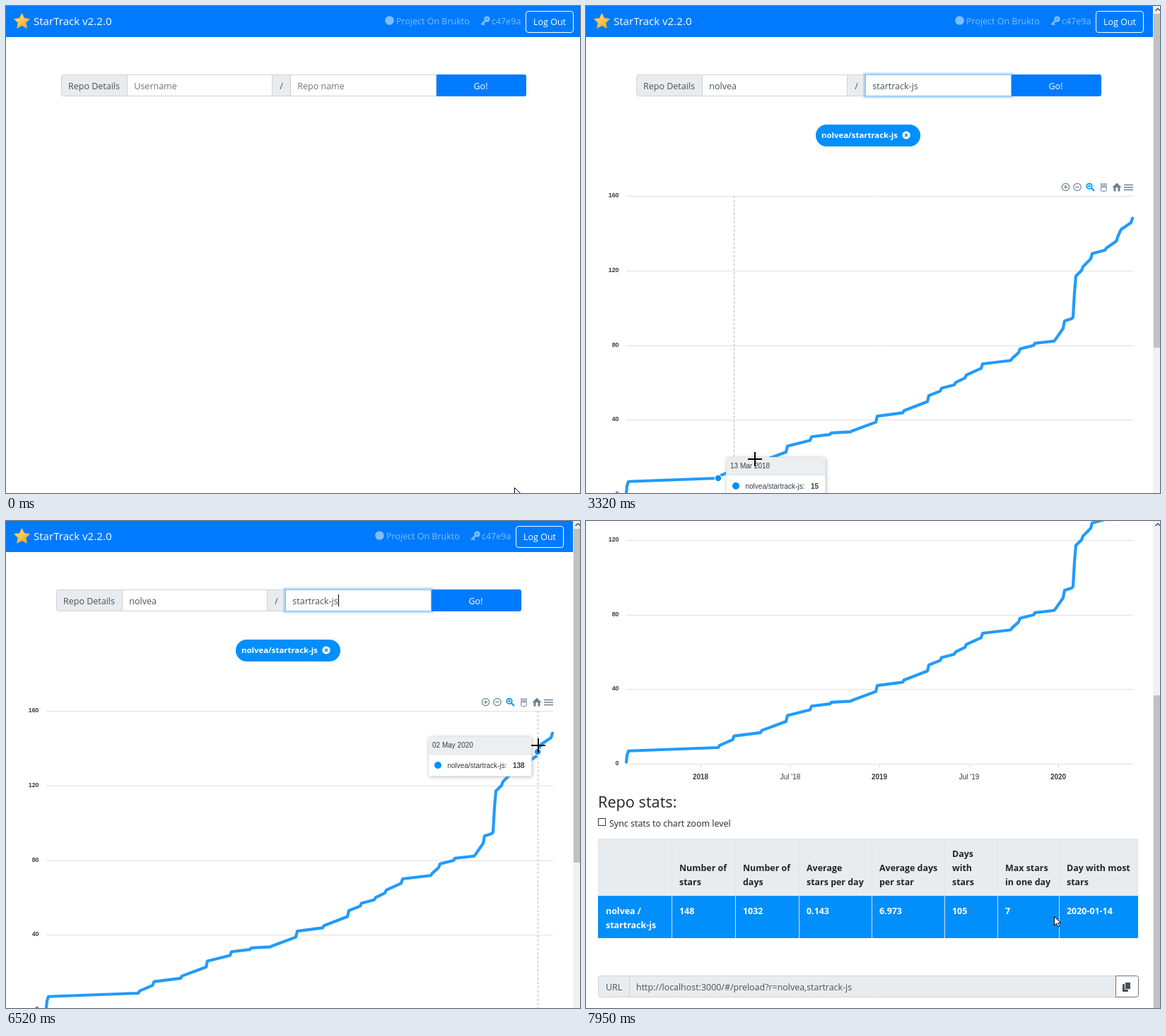
An HTML page with a canvas for the animation above (8 s loop, 812x690 px).

```html
<!DOCTYPE html>
<html lang="en">
<head>
<meta charset="utf-8">
<title>StarTrack</title>
<style>
html, body { margin: 0; width: 100%; height: 100%; overflow: hidden; background: #fff; }
canvas { display: block; }
</style>
</head>
<body>
<canvas id="stage" width="812" height="690"></canvas>
<script>
const ctx = document.getElementById('stage').getContext('2d');
const LOOP = 8000, USER = 'nolvea', REPO = 'startrack-js', TOKEN = 'c47e9a';
const UI = '"Open Sans", "Noto Sans", sans-serif', CHART = '"Liberation Sans", Arial, sans-serif';
const BLUE = '#007bff', SERIES = '#008ffb', GREY = '#e9ecef', EDGE = '#ced4da', INK = '#495057', DARK = '#212529', ICON = '#6e8192';
const LOADED = 2650, HOVER_START = 3120, HOVER_END = 6320, LEAVE_CHART = 7250;

// A few milestones (x, stars); between them the count climbs slowly, then jumps.
const MILESTONES = [[57, 1], [60, 7], [189, 10], [209.4, 15], [249, 18], [285, 26], [319, 31], [347, 33], [376, 34],
  [412, 42], [450, 45], [485, 53], [503, 57], [523, 60], [538, 64], [561, 70], [603, 73], [614, 78], [635, 81], [664, 83],
  [677, 93], [689, 95], [693, 117], [703, 122], [716, 129], [736, 132], [752.2, 138], [757, 142], [773, 148]];
const points = MILESTONES.flatMap(([x, v], i) =>
  i ? [[x - 2, v - .4 * (v - MILESTONES[i - 1][1])], [x, v]] : [[x, v]]);

// Key rows: time, values...
const HOVER_X = [[3120, 187], [3320, 239], [4220, 365], [4320, 490], [4420, 523], [4520, 528], [5120, 671], [6320, 753]];
const POINTER = [[100, 720, 682], [700, 218, 122], [2550, 218, 122], [3120, 187, 661],
  [7150, 753, 319], [7750, 734, 543], [7950, 663, 560]];

const clamp = (v, lo, hi) => Math.max(lo, Math.min(hi, v));
const chartY = stars => 692.3 - 2.647 * stars;

function sample(rows, at) {
  if (at <= rows[0][0]) return rows[0].slice(1);
  const next = rows.findIndex(row => row[0] > at);
  if (next < 0) return rows[rows.length - 1].slice(1);
  const a = rows[next - 1], b = rows[next], k = (at - a[0]) / (b[0] - a[0]);
  return a.slice(1).map((v, i) => v + (b[i + 1] - v) * k);
}

// While hovering, the pointer rides along the line.
function pointerAt(t) {
  if (t < HOVER_START || t > 7150) return sample(POINTER, t);
  const [x] = sample(HOVER_X, t);
  return [x, chartY(sample(points, x)[0]) - 8];
}
function nearestPoint(t) {
  const [x] = sample(HOVER_X, t);
  return points.reduce((best, p) => Math.abs(p[0] - x) < Math.abs(best[0] - x) ? p : best);
}
const scrollAt = t => Math.round(348 * (1 - (1 - clamp((t - 6650) / 500, 0, 1)) ** 2.2));

function text(str, x, y, size, color, { bold = false, align = 'left', family = UI } = {}) {
  ctx.font = `${bold ? 'bold ' : ''}${size}px ${family}`;
  ctx.textAlign = align;
  ctx.fillStyle = color;
  ctx.fillText(str, x, y);
}
function box(x, y, w, h, fill, edge, radius = 0) {
  ctx.beginPath();
  ctx.roundRect(edge ? x + .5 : x, edge ? y + .5 : y, edge ? w - 1 : w, edge ? h - 1 : h, radius);
  if (fill) { ctx.fillStyle = fill; ctx.fill(); }
  if (edge) { ctx.strokeStyle = edge; ctx.lineWidth = 1; ctx.stroke(); }
}
function dot(x, y, r, fill, edge, width = 1) {
  ctx.beginPath();
  ctx.arc(x, y, r, 0, 7);
  if (fill) { ctx.fillStyle = fill; ctx.fill(); }
  if (edge) { ctx.strokeStyle = edge; ctx.lineWidth = width; ctx.stroke(); }
}
function line(coords, color, width = 1) {
  ctx.beginPath();
  for (let i = 0; i < coords.length; i += 2) ctx.lineTo(coords[i], coords[i + 1]);
  ctx.strokeStyle = color;
  ctx.lineWidth = width;
  ctx.stroke();
}
function polygon(coords, fill, edge) {
  ctx.beginPath();
  for (let i = 0; i < coords.length; i += 2) ctx.lineTo(coords[i], coords[i + 1]);
  ctx.closePath();
  ctx.fillStyle = fill;
  ctx.fill();
  if (edge) { ctx.strokeStyle = edge; ctx.lineWidth = 1; ctx.stroke(); }
}

function navbar(shift) {
  const pale = '#80bdff';
  box(0, 0, 812, 44, BLUE);
  const star = [];
  for (let i = 0; i < 10; i++) {
    const r = i % 2 ? 5.6 : 11.5, a = i * Math.PI / 5 - Math.PI / 2;
    star.push(22.5 + r * Math.cos(a), 22 + r * Math.sin(a));
  }
  const gold = ctx.createLinearGradient(14, 10, 30, 33);
  gold.addColorStop(0, '#ffe680');
  gold.addColorStop(1, '#f2a51d');
  polygon(star, gold, '#e9b44a');
  text('StarTrack v2.2.0', 39, 27, 15.1, '#fff');
  ctx.save();
  ctx.translate(-shift, 0);
  dot(542.5, 20.5, 6.3, pale);
  text('Project On Brukto', 552, 25.5, 12.5, pale);
  line([672.5, 26.5, 679, 20], pale, 2.6);
  line([674, 24.5, 677, 27], pale, 2);
  dot(680.5, 18.5, 2.6, null, pale, 3);
  text(TOKEN, 687, 25.5, 12.5, pale);
  box(735, 7, 68, 31, null, '#fff', 3.5);
  text('Log Out', 769, 27, 12.5, '#fff', { align: 'center' });
  ctx.restore();
}

function form(t, shift) {
  const typed = (str, begin) => str.slice(0, clamp(Math.floor((t - begin) / 60), 0, str.length));
  const focus = t >= 1270 ? 1 : t >= 790 ? 0 : -1;
  const fields = [
    { x: 171, w: 206, value: typed(USER, 850), hint: 'Username' },
    { x: 402, w: 207, value: typed(REPO, 1270), hint: 'Repo name' }];
  ctx.save();
  ctx.translate(-shift / 2, 0);
  box(78, 97, 94, 31, GREY, EDGE, [3, 0, 0, 3]);
  text('Repo Details', 88, 117.5, 12.5, INK);
  box(376, 97, 27, 31, GREY, EDGE);
  text('/', 389.5, 117.5, 12.5, INK, { align: 'center' });
  box(608, 97, 128, 31, BLUE, null, 3);
  text('Go!', 671.5, 117.5, 12.5, '#fff', { align: 'center' });
  fields.forEach(({ x, w, value, hint }, i) => {
    const active = i === focus;
    box(x, 97, w, 31, '#fff', active ? '#80bdff' : EDGE);
    if (active) {
      ctx.strokeStyle = 'rgba(0,123,255,.25)';
      ctx.lineWidth = 2.7;
      ctx.strokeRect(x - 1.3, 95.7, w + 2.6, 33.6);
    }
    text(value || hint, x + 10.3, 117.5, 12.5, value ? INK : '#6c757d');
    const caretOn = t < 2050 || (t + 80) % 600 < 300;
    if (active && caretOn) {
      const end = x + 10.3 + (value ? ctx.measureText(value).width : 0);
      box(Math.round(end), 104, 1, 17, '#000');
    }
  });
  ctx.restore();
}

function progress(t) {
  box(0, 44, 812, 13, GREY);
  box(0, 44, 812 * clamp((t - 2350) / 300, 0, 1), 13, '#28a745');
}

function toolbar() {
  for (const x of [678.5, 695]) {
    dot(x, 256.5, 5.2, null, ICON, 1.2);
    line([x - 2.8, 256.5, x + 2.8, 256.5], ICON, 1.2);
  }
  line([678.5, 253.7, 678.5, 259.3], ICON, 1.2);
  dot(712, 255.3, 3.7, null, SERIES, 1.7);
  line([710, 255.3, 714, 255.3], SERIES, 1.2);
  line([712, 253.3, 712, 257.3], SERIES, 1.2);
  line([715, 258, 719, 262], SERIES, 2);
  box(728, 256, 9, 7, null, ICON, 2);
  for (let i = 0; i < 4; i++) line([729 + i * 2.3, 257, 729 + i * 2.3, 251], ICON, 1.2);
  polygon([744.5, 257, 751, 250.5, 757.5, 257], ICON);
  box(746.5, 257, 3, 5.5, ICON);
  box(752.5, 257, 3, 5.5, ICON);
  for (const y of [253.5, 257, 260.5]) line([761, y, 774, y], ICON, 1.5);
}

const chartText = (str, x, y, size, options) => text(str, x, y, size, '#373d3f', { family: CHART, ...options });

function chart(t) {
  box(325, 168, 148, 31, SERIES, null, 15.5);
  text(`${USER}/${REPO}`, 333, 187, 11.4, '#fff', { bold: true });
  dot(453, 183, 5.6, '#fff');
  line([451, 181, 455, 185], SERIES, 1.6);
  line([455, 181, 451, 185], SERIES, 1.6);
  toolbar();

  for (let v = 0; v <= 160; v += 40) {
    const y = Math.round(chartY(v)) + .5;
    line([57, y, 774, y], '#e0e0e0');
    chartText(String(v), 46.5, y + 1.5, 8.9, { align: 'right', bold: true });
  }
  for (let half = 0; half < 5; half++) {
    const x = Math.round(162 + half * 126.5), year = 2018 + Math.floor(half / 2);
    line([x + .5, 692, x + .5, 698], '#e0e0e0');
    chartText(half % 2 ? `Jul '${year - 2000}` : String(year), x, 713.5, 10, { align: 'center', bold: half % 2 === 0 });
  }

  const hovering = t >= HOVER_START + 80 && t < LEAVE_CHART;
  const cross = nearestPoint(t - 100), marker = nearestPoint(t - 200);
  if (hovering) {
    const x = Math.floor(cross[0]) + .5;
    ctx.setLineDash([3, 3]);
    line([x, 269, x, 692], '#b6b6b6');
    ctx.setLineDash([]);
  }

  const k = clamp((t - LOADED) / 520, 0, 1), grow = k * k * (3 - 2 * k);
  ctx.save();
  ctx.lineJoin = ctx.lineCap = 'round';
  line(points.flatMap(([x, v]) => [x, chartY(v * grow)]), '#229bfb', 4.2);
  ctx.restore();
  if (hovering) hover(cross, marker);
}

// The tooltip glides from the marker's point towards the crosshair's point.
function hover(cross, marker) {
  dot(marker[0], chartY(marker[1]), 4.8, SERIES, '#fff', 1.2);
  const date = new Date(Date.UTC(2018, 0, 1 + Math.round((cross[0] - 160.1) / .695)));
  const label = date.toLocaleDateString('en-GB', { day: '2-digit', month: 'short', year: 'numeric', timeZone: 'UTC' })
    .replace('Sept', 'Sep');
  const stars = Math.round(cross[1]), w = stars > 99 ? 147 : 141;
  const left = cross[0] < 415 ? 0 : -w - 8;
  const x = Math.round((cross[0] + marker[0]) / 2 + left);
  const y = Math.round(chartY((cross[1] + marker[1]) / 2) - 22);

  ctx.save();
  ctx.shadowColor = 'rgba(120,120,120,.45)';
  ctx.shadowBlur = 5;
  ctx.shadowOffsetX = ctx.shadowOffsetY = 1;
  box(x, y, w, 57, '#fff', null, 4);
  ctx.restore();
  box(x, y, w, 57, '#fff', '#e3e3e3', 4);
  box(x + 1, y + 1, w - 2, 25, '#eceff1', null, [3, 3, 0, 0]);
  line([x, y + 25.5, x + w, y + 25.5], '#dde1e4');
  chartText(label, x + 6, y + 16, 10);
  dot(x + 14, y + 41, 5, SERIES);
  chartText(`${USER}/${REPO}:`, x + 27.5, y + 45, 10);
  chartText(String(stars), x + 120, y + 45, 10, { bold: true });

  const mid = Math.round(cross[0]);
  box(mid - 47, 695, 94, 31, '#eceff1', '#90a4ae', 2);
  polygon([mid - 5, 696, mid, 690.5, mid + 5, 696], '#eceff1');
  line([mid - 5, 695.5, mid, 690.5, mid + 5, 695.5], '#90a4ae');
  chartText(label, mid, 713.5, 10, { align: 'center' });
}

const COLUMNS = [
  [17, '', `${USER} /|${REPO}`], [121, 'Number of|stars', '148'], [211, 'Number of|days', '1032'],
  [301, 'Average|stars per day', '0.143'], [404, 'Average days|per star', '6.973'], [507, 'Days|with|stars', '105'],
  [582, 'Max stars|in one day', '7'], [669, 'Day with most|stars', '2020-01-14']];

function stats() {
  text('Repo stats:', 17, 754, 21.7, DARK);
  box(17, 769, 11, 11, '#fff', '#333');
  text('Sync stats to chart zoom level', 33, 781, 12.5, DARK);
  box(17, 798, 764, 82, GREY, '#dee2e6');
  box(17, 879, 764, 60, SERIES);
  COLUMNS.forEach(([x, title, value], i) => {
    if (i) line([x + .5, 798, x + .5, 939], '#dee2e6');
    const rows = title.split('|');
    rows.forEach((row, n) => text(row, x + 11, 864 - 20 * (rows.length - 1 - n), 12.45, DARK, { bold: true }));
    value.split('|').forEach((row, n) => text(row, x + 11, 905 + 20 * n, 12.45, '#fff', { bold: true }));
  });
  box(17, 992, 45, 31, GREY, EDGE, [3, 0, 0, 3]);
  text('URL', 28, 1013, 12.4, INK);
  box(61, 992, 689, 31, GREY, EDGE);
  text(`http://localhost:3000/#/preload?r=${USER},${REPO}`, 71, 1013, 12.45, INK);
  box(749, 992, 33, 31, '#fff', '#6c757d', [0, 3, 3, 0]);
  box(759, 1004, 8, 11, INK, null, 1);
  box(762, 1001, 9, 11, INK, '#fff', 1);
}

function scrollbar(scroll) {
  box(802, 0, 10, 690, '#f1f1f1');
  box(803, Math.round(11 + scroll * .679), 9, 473, '#c1c1c1');
  line([805.5, 7, 809, 3.5, 812.5, 7], '#505050', 1.5);
}

function pointer(t) {
  if (t >= 910 && t < 2200) return; // hidden while typing
  const [x, y] = pointerAt(t).map(Math.round);
  ctx.save();
  ctx.translate(x, y);
  if (t >= LOADED && t < LEAVE_CHART && y > 269) {
    line([-10, 1, 10, 1], '#000', 2);
    line([0, -9, 0, 11], '#000', 2);
  } else if (y > 97 && y < 128 && x < 376) {
    line([.5, -6, .5, 6], '#000');
    line([-2.5, -6.5, 3.5, -6.5], '#000');
    line([-2.5, 6.5, 3.5, 6.5], '#000');
  } else {
    polygon([-.5, .5, -.5, 13, 2.5, 10.2, 4.5, 15, 6.8, 14, 4.8, 9.5, 8.6, 9.3], '#fff', '#000');
  }
  ctx.restore();
}

function stepTime(t) {
  if (t >= 900 && t < 2250) return t;
  const offset = t >= 6550 ? 50 : t >= 3320 ? 20 : t >= 2250 ? 50 : 0;
  return Math.floor((t - offset) / 100) * 100 + offset;
}

function draw(now) {
  const t = stepTime(now % LOOP);
  const loaded = t >= LOADED, shift = loaded ? 14 : 0, scroll = scrollAt(t);
  box(0, 0, 812, 690, '#fff');
  ctx.save();
  ctx.translate(0, -scroll);
  navbar(shift);
  form(t, shift);
  if (t >= 2400 && !loaded) progress(t);
  if (loaded) {
    chart(t);
    stats();
  }
  ctx.restore();
  if (loaded) scrollbar(scroll);
  pointer(t);
}

const start = performance.now();
function tick() {
  draw(performance.now() - start);
  requestAnimationFrame(tick);
}
tick();
</script>
</body>
</html>
```
